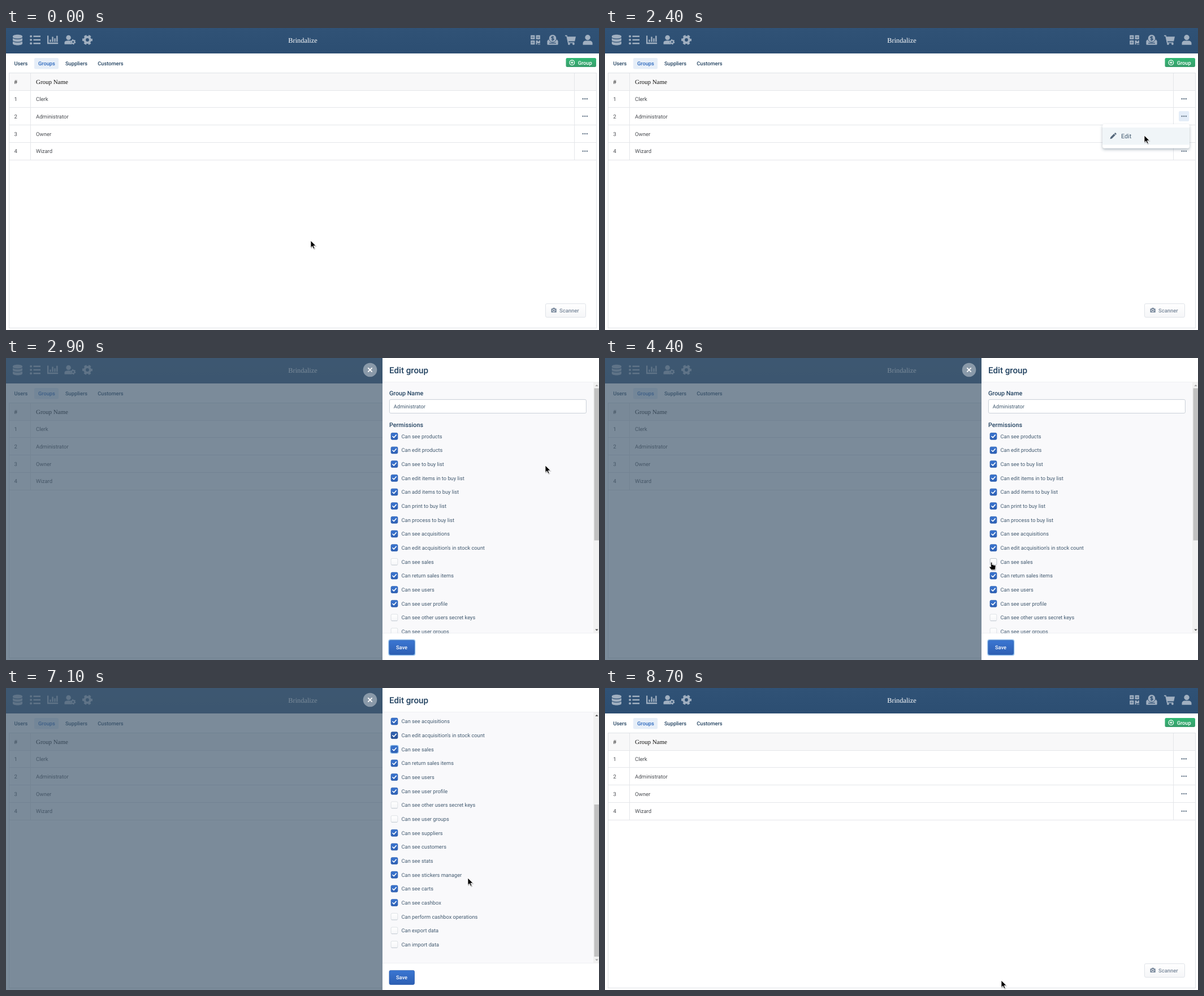
Recreate the animation shown at these times as an HTML page. Size 1049 px wide and 534 px high, loop 9.5 s.

```html
<!DOCTYPE html>
<html lang="en">
<head>
<meta charset="utf-8">
<title>Group permissions</title>
<style>
  html, body { margin: 0; width: 100%; height: 100%; overflow: hidden; background: #fff; }
  svg { display: block; }
  text { font-family: Roboto, sans-serif; font-size: 9.28px; text-rendering: geometricPrecision; white-space: pre; }
  .serif { font-family: "Liberation Serif", serif; font-size: 10.95px; fill: #111; }
  .medium { font-weight: 500; }
  .cell { font-size: 9.5px; fill: #4a4d52; }
  .label { fill: #425a70; }
  .head { font-weight: 500; font-size: 10.75px; fill: #234361; }
  .line { stroke: #e4e6e9; fill: none; }
  .icon { fill: #a0afc0; stroke: none; }
  .icon .st { fill: none; stroke: #a0afc0; }
  .icon .cut { fill: none; stroke: #2e5074; }
  .box { fill: url(#plain); stroke: #435a6f; stroke-opacity: .2; stroke-width: .8; }
  .foot { stroke: #435a6f; stroke-opacity: .16; }
  .tick { fill: none; stroke: #fff; stroke-width: 1.6; stroke-linecap: round; stroke-linejoin: round; visibility: hidden; }
  .halo { fill: #8dbdee; visibility: hidden; }
  .on .box { fill: url(#blue); stroke: #2a5cad; stroke-opacity: 1; }
  .on .foot { visibility: hidden; }
  .on .tick { visibility: visible; }
  .hot .box { stroke-opacity: .42; }
  .on.hot .box { fill: url(#deep); stroke: #22498c; stroke-opacity: 1; }
  .ring .halo { visibility: visible; }
</style>
</head>
<body>
<svg id="stage" width="1049" height="534" viewBox="0 0 1049 534" xmlns="http://www.w3.org/2000/svg">
  <defs>
    <linearGradient id="bar" x2="0" y2="1"><stop stop-color="#305276"/><stop offset="1" stop-color="#2c4e72"/></linearGradient>
    <linearGradient id="blue" x2="0" y2="1"><stop stop-color="#3a76d2"/><stop offset="1" stop-color="#2d5fb3"/></linearGradient>
    <linearGradient id="deep" x2="0" y2="1"><stop stop-color="#3164b5"/><stop offset="1" stop-color="#274f96"/></linearGradient>
    <linearGradient id="green" x2="0" y2="1"><stop stop-color="#30b873"/><stop offset="1" stop-color="#399d6c"/></linearGradient>
    <linearGradient id="plain" x2="0" y2="1"><stop stop-color="#fff"/><stop offset="1" stop-color="#f5f6f8"/></linearGradient>
    <filter id="soft" x="-20%" y="-30%" width="140%" height="190%"><feDropShadow dx="0" dy="2.5" stdDeviation="2.6" flood-color="#435a6f" flood-opacity=".42"/></filter>
    <filter id="drop" x="-50%" y="-50%" width="220%" height="220%"><feDropShadow dx=".8" dy="1" stdDeviation=".7" flood-opacity=".35"/></filter>
    <clipPath id="view"><rect x="666" y="42.5" width="373" height="444"/></clipPath>
  </defs>

  <rect width="1049" height="534" fill="#fff"/>
  <rect width="1049" height="45" fill="url(#bar)"/>
  <text class="serif" x="525" y="26" text-anchor="middle" style="font-size:12.35px;fill:#fff">Brindalize</text>

  <g class="icon">
    <g transform="translate(20.5 21)">
      <path d="M-8.5-6.3C-8.5-10.3 8.5-10.3 8.5-6.3V6.5C8.5 10.5-8.5 10.5-8.5 6.5Z"/>
      <path class="cut" stroke-width="1.2" d="M-8.7-4.2C-7-.9 7-.9 8.7-4.2M-8.7 1.6C-7 4.9 7 4.9 8.7 1.6"/>
    </g>
    <g transform="translate(51.5 21)">
      <circle cx="-7.4" cy="-6.3" r="2"/><circle cx="-7.4" r="2"/><circle cx="-7.4" cy="6.3" r="2"/>
      <path class="st" stroke-width="2.4" d="M-3-6.3H9.5M-3 0H9.5M-3 6.3H9.5"/>
    </g>
    <g transform="translate(82.5 21)">
      <path class="st" stroke-width="2.3" d="M-8.4-7.5V6H9.6"/>
      <path class="st" stroke-width="2.4" d="M-4 3.4V-.6M0 3.4V-5.5M4 3.4V-2.8M7.8 3.4V-7.2"/>
    </g>
    <g transform="translate(113 21)">
      <circle cx="-2.4" cy="-4" r="4.3"/>
      <path d="M-9.5 7.8V5C-9.5 2-6.5 1.2-2.4 1.2C-.3 1.2 1 1.4 1.8 2L1.6 5.5L4 7.8Z"/>
      <circle class="st" cx="5.6" cy="3.6" r="2.6" stroke-width="2"/>
      <circle class="st" cx="5.6" cy="3.6" r="4" stroke-width="1.5" stroke-dasharray="2.1 2.09"/>
    </g>
    <g transform="translate(144 21)">
      <circle class="st" r="4.9" stroke-width="4"/>
      <circle class="st" r="7.6" stroke-width="2.8" stroke-dasharray="4.4 3.56" stroke-dashoffset="2.2"/>
    </g>
    <g transform="translate(936.5 21)">
      <path class="st" stroke-width="2.2" d="M-7.2-7.2h5v5h-5zM2.2-7.2h5v5h-5zM-7.2 2.2h5v5h-5z"/>
      <path d="M-5.6-5.6h1.8v1.8h-1.8zM3.8-5.6h1.8v1.8h-1.8zM-5.6 3.8h1.8v1.8h-1.8zM1.1 1.1h3v2h2v-2h2.2v5h-4.4v-1.2h-.8v3.4h-2zM4.5 7h1.6v1.4h-1.6zM6.8 7h1.6v1.4h-1.6z"/>
    </g>
    <g transform="translate(967 21)">
      <path d="M-9.6 2L-6.8-1.5H6.8L9.6 2V7.5Q9.6 8.8 8.3 8.8H-8.3Q-9.6 8.8-9.6 7.5Z"/>
      <circle cy="-2.6" r="6.8" stroke="#2e5074"/>
      <path class="cut" stroke-width="1.3" d="M2.2-4.6C1.4-6-2.2-6-2.2-4.1C-2.2-2.1 2.2-3.2 2.2-1.2C2.2.7-1.6.7-2.3-.8M0-6.8V1.8M-6 5.8H6"/>
    </g>
    <g transform="translate(998.5 21)">
      <path d="M-9.5-8.2H-6L-5.4-5.8H9.5L7.7 2.6H-3.5L-3.2 4.2H6.8V5.8H-4.6L-7.2-6.4H-9.5Z"/>
      <circle cx="-2.6" cy="7" r="1.9"/><circle cx="5.4" cy="7" r="1.9"/>
    </g>
    <g transform="translate(1029 21)">
      <circle cy="-4.3" r="4.7"/>
      <path d="M-8.5 8.8V6C-8.5 2.6-5.6 1.4-3.2 1.4H3.2C5.6 1.4 8.5 2.6 8.5 6V8.8Z"/>
    </g>
  </g>

  <rect x="50" y="53" width="43" height="19.5" rx="2.3" fill="#e6eef8"/>
  <g class="medium" fill="#234361">
    <text x="14.5" y="66.3">Users</text>
    <text x="57" y="66.3" fill="#2a67bd">Groups</text>
    <text x="105" y="66.3">Suppliers</text>
    <text x="162.3" y="66.3">Customers</text>
  </g>
  <rect x="990.5" y="53" width="53.5" height="16" rx="2.3" fill="url(#green)"/>
  <circle cx="1001.3" cy="61.2" r="4.3" fill="none" stroke="#fff" stroke-width="1.2"/>
  <path d="M999 61.2h4.6M1001.3 58.9v4.6" stroke="#fff" stroke-width="1.2"/>
  <text class="medium" x="1011.7" y="64.7" fill="#fff">Group</text>

  <rect x="5" y="79.5" width="1040" height="30.5" fill="#f8f8f9"/>
  <g id="table"></g>
  <path class="line" d="M43.5 79.5V233.5M1005.5 79.5V233.5M5 110.5H1045"/>
  <rect x="5.5" y="79.5" width="1039" height="451" fill="none" stroke="#dfe2e6"/>
  <text class="serif" x="14.5" y="99">#</text>
  <text class="serif" x="53" y="99">Group Name</text>

  <rect x="954.5" y="487.5" width="71" height="24" rx="2.3" fill="url(#plain)" stroke="#dfe3e8"/>
  <path d="M964.5 496.3h2l1-1.6h3.2l1 1.6h2v6.8h-9.2z" fill="#75869a"/>
  <circle cx="969" cy="499.5" r="2.1" fill="none" stroke="#fff"/>
  <text class="medium" x="979" y="503" fill="#7b8a9c" style="font-size:9.45px">Scanner</text>

  <g id="menu">
    <rect x="880" y="170" width="154" height="42.5" rx="4" fill="#fff" filter="url(#soft)"/>
    <rect id="item" x="880" y="176" width="154" height="30.5" fill="#f0f5f8"/>
    <path d="M893.5 196.3l.8-3.2 6-6 2.4 2.4-6 6zM901 186.4l1-1q.7-.5 1.4.2l.9.9q.6.7.1 1.4l-1 1z" fill="#56687c"/>
    <text x="913" y="195" class="label" style="font-size:10.75px">Edit</text>
  </g>

  <rect id="shade" width="1049" height="534" fill="#435a6f"/>
  <g id="close">
    <circle r="12.3" fill="#fff" fill-opacity=".4"/>
    <path d="M-3.7-3.7L3.7 3.7M3.7-3.7L-3.7 3.7" stroke="#fff" stroke-width="1.8"/>
  </g>
  <g id="drawer">
    <rect x="666" width="383" height="534" fill="#fff"/>
    <rect x="666" y="42" width="383" height="445" fill="#f9f9fb"/>
    <path d="M666 42.5H1049M666 486.5H1049" stroke="#eef0f3"/>
    <text class="head" x="678" y="27" style="font-size:15.2px">Edit group</text>
    <g clip-path="url(#view)"><g id="list">
      <text class="head" x="678" y="66">Group Name</text>
      <rect x="678.4" y="73.4" width="348" height="24.2" rx="2.3" fill="#fff" stroke="#c3cbd4" stroke-width=".9"/>
      <text class="label" x="685.7" y="89.3">Administrator</text>
      <text class="head" x="678" y="121.8">Permissions</text>
    </g></g>
    <rect x="1039" y="42" width="10" height="445" fill="#f1f1f1"/>
    <rect id="thumb" x="1040.5" width="8.5" height="269" fill="#c1c1c1"/>
    <path id="up" d="M1042.3 50h5.4l-2.7-3z"/>
    <path id="down" d="M1042.3 479.5h5.4l-2.7 3z"/>
    <g id="save">
      <rect class="halo" x="676.3" y="497.6" width="48" height="28.6" rx="3.5"/>
      <rect class="box" x="678" y="499.4" width="44.5" height="25" rx="2.3"/>
      <text class="medium" x="690" y="515.4" fill="#fff">Save</text>
    </g>
  </g>

  <g id="cursor" filter="url(#drop)">
    <path id="arrow" d="M0 0V12.4L2.9 9.8L5 14.4L7 13.5L5 9.1H9.2Z" stroke="#fff" stroke-width=".8"/>
    <path id="hand" d="M-.6.4C-.6-1.2 1.6-1.2 1.7.3L2 3.6C3-.2.2 3.4 4.2 4C5-.1.2 3.7 6 4.6C7.4 4.1 8.2 5 8 6.6L7.5 9.5L6.8 12.4H.3L-2.7 8.5C-3.4 7.2-1.8 6.3-.9 7.2L-.3 7.7Z" stroke="#fff" stroke-width=".7"/>
  </g>
</svg>

<script>
const $ = id => document.getElementById(id);
const LOOP = 9500, STEP = 100;
const add = (id, markup) => $(id).insertAdjacentHTML('beforeend', markup);

['Clerk', 'Administrator', 'Owner', 'Wizard'].forEach((name, i) => {
  const y = 125.3 + 30.8 * i;
  const dots = [-3.6, 0, 3.6].map(d => `<circle cx="${1024.2 + d}" cy="${y}" r="1.25" fill="#66788a"/>`).join('');
  const glow = i === 1 ? `<rect id="glow" x="1015" y="147" width="18.3" height="18" rx="2.3" fill="#e4edf8"/>` : '';
  add('table', `<text class="cell" x="14.5" y="${y + 3.6}">${i + 1}</text>
    <text class="cell" x="53" y="${y + 3.6}">${name}</text>${glow}${dots}
    <path class="line" d="M5 ${Math.round(y + 15) + .5}H1045"/>`);
});

const SALES = 9;
const off = [SALES, 13, 14, 21, 22, 23];
const rights = ['see products', 'edit products', 'see to buy list', 'edit items in to buy list',
  'add items to buy list', 'print to buy list', 'process to buy list', 'see acquisitions',
  "edit acquisition's in stock count", 'see sales', 'return sales items', 'see users',
  'see user profile', 'see other users secret keys', 'see user groups', 'see suppliers',
  'see customers', 'see stats', 'see stickers manager', 'see carts', 'see cashbox',
  'perform cashbox operations', 'export data', 'import data'];
rights.forEach((right, i) => {
  add('list', `<g id="row${i}" transform="translate(687 ${138.4 + 24.66 * i})">
    <rect class="halo" x="-7.6" y="-7.6" width="15.2" height="15.2" rx="3.4"/>
    <rect class="box" x="-5.9" y="-5.9" width="11.8" height="11.8" rx="2"/>
    <path class="foot" d="M-5 5.6H5"/>
    <path class="tick" d="M-3 .2L-.9 2.4L3.2-2.3"/>
    <text class="label" x="12.6" y="3.4">Can ${right}</text></g>`);
});
const rows = rights.map((_, i) => $('row' + i));

// [time, x, y, hand]
const moves = [[0, 539, 376], [100, 623, 346]];
const glide = (start, count, from, to, pow, hand) => {
  for (let k = 1; k <= count; k++) {
    const e = 1 - (1 - k / count) ** pow;
    moves.push([start + (k - 1) * STEP, from[0] + (to[0] - from[0]) * e, from[1] + (to[1] - from[1]) * e, hand(k)]);
  }
};
glide(300, 8, [623, 346], [1027, 156], 1.6, k => k > 6);
glide(1400, 7, [1027, 156], [954, 190], 1.2, k => k < 2);
moves.push([3200, 933, 200], [3400, 871, 232], [3600, 804, 282, 1], [3800, 750, 326, 1],
  [3900, 716, 357, 1], [4100, 696, 361, 1], [4200, 686, 362, 1], [4400, 683, 362, 1],
  [4900, 691, 362, 1], [5100, 807, 335, 1], [5300, 817, 336, 1], [7100, 817, 336],
  [7700, 701, 517, 1], [8700, 701, 517]);

const scrolls = [[0, 0], [5500, 54], [5700, 108], [6000, 198], [6300, 252]];
const hovers = [[0, -1], [3600, 6], [3800, 8], [3900, SALES], [5100, 8], [7700, -1]];
// [time, drawer shift, shade opacity, close x, close turn]
const sheets = [[0, 400, 0, 1100, 0], [2500, 190, .35, 846, 45], [2900, 0, .7, 644, 0],
  [8500, 68, .5, 721, 45], [8700, 400, 0, 1100, 0]];

const at = (track, t) => track.findLast(entry => entry[0] <= t);
const show = (id, on) => $(id).style.display = on ? '' : 'none';
const set = (id, name, value) => $(id).setAttribute(name, value);

function draw(t) {
  const [, x, y, hand] = at(moves, t);
  set('cursor', 'transform', `translate(${x} ${y})`);
  show('arrow', !hand);
  show('hand', hand);

  const open = t >= 1400 && t < 2500;
  show('glow', open);
  show('menu', open);
  const size = t < 1500 ? .9 : 1;
  set('menu', 'transform', `translate(1024 170) scale(${size}) translate(-1024 -170)`);
  set('menu', 'opacity', t < 1500 ? .6 : 1);
  show('item', t >= 1700);
  set('item', 'fill', t >= 2300 && t < 2400 ? '#e8f0f6' : '#f0f5f8');

  const [, shift, dim, closeX, turn] = at(sheets, t);
  set('drawer', 'transform', `translate(${shift} 0)`);
  set('shade', 'opacity', dim);
  set('close', 'transform', `translate(${closeX} 21) rotate(${turn})`);

  const top = at(scrolls, t)[1];
  set('list', 'transform', `translate(0 ${-top})`);
  set('thumb', 'y', 53.5 + top * .605);
  set('up', 'fill', top > 0 ? '#505050' : '#a3a3a3');
  set('down', 'fill', top < 252 ? '#505050' : '#a3a3a3');

  const hover = at(hovers, t)[1], picked = t >= 4700;
  rows.forEach((row, i) => {
    row.classList.toggle('on', !off.includes(i) || (i === SALES && picked));
    row.classList.toggle('hot', i === hover);
    row.classList.toggle('ring', i === SALES && picked && t < 8300);
  });
  const pressed = t >= 8300;
  set('save', 'class', 'on' + (pressed ? ' hot' : '') + (pressed || !picked ? ' ring' : ''));
}

const start = performance.now();
function tick() {
  draw((performance.now() - start) % LOOP);
  requestAnimationFrame(tick);
}
tick();
</script>
</body>
</html>
```
